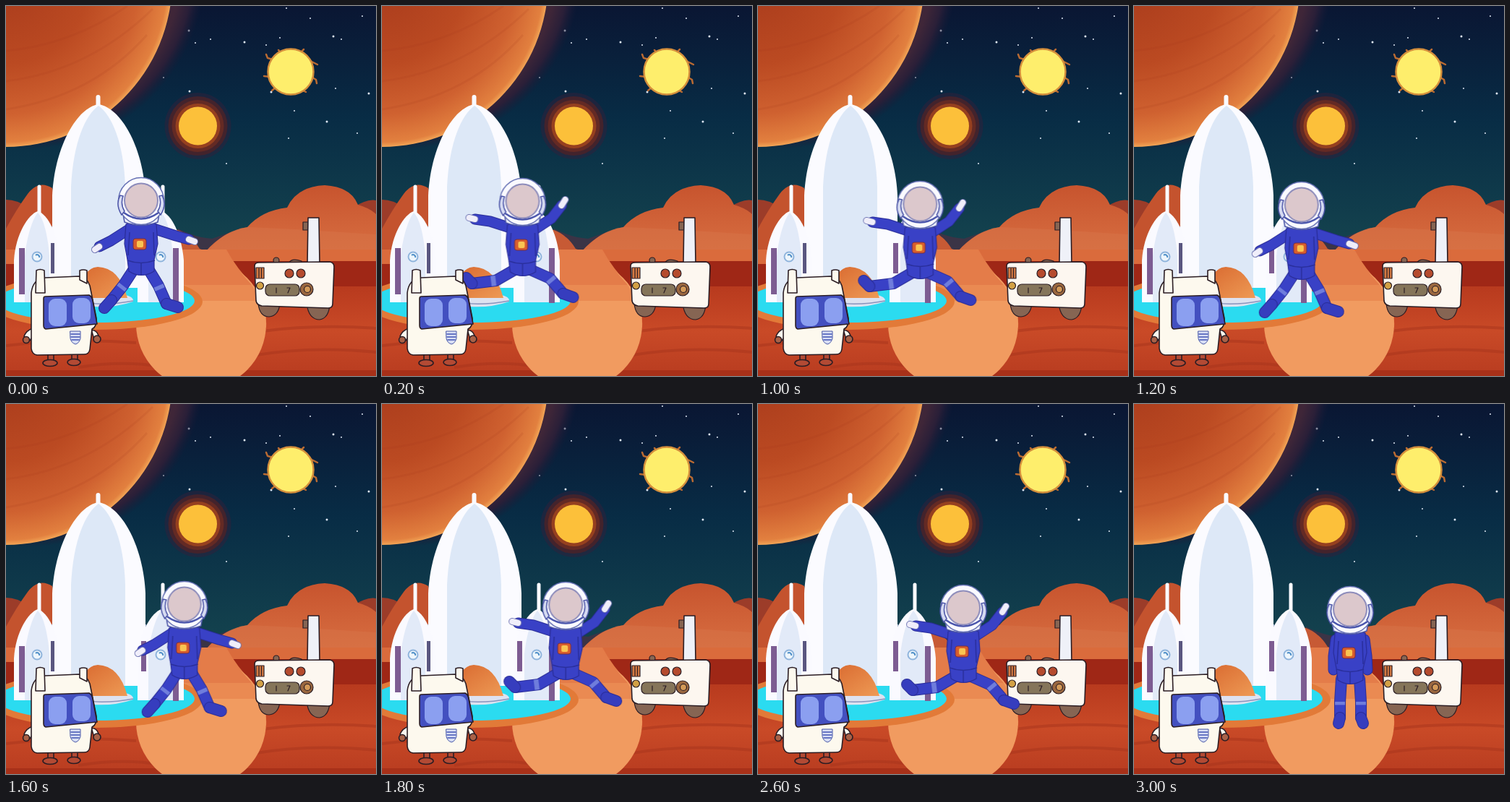
An HTML page that plays this animation: 512 by 512 pixels, repeating every 3.2 s.

```html
<!DOCTYPE html>
<html lang="en">
<head>
<meta charset="utf-8">
<title>Jumping astronaut</title>
<style>
  html, body { margin: 0; width: 100%; height: 100%; overflow: hidden; background: #a83a20; }
  svg { display: block; width: 100vw; height: 100vh; }
  .ink { stroke: #2b1d24; stroke-width: 1.6; stroke-linejoin: round; stroke-linecap: round; }
  .limb { fill: none; stroke-linejoin: round; }

  #astronaut { animation: travel 3200ms steps(16) infinite; }
  .pose { animation: 800ms step-end infinite; }
  #half { animation-name: half; }
  #full { animation-name: full; }
  #stand { animation-name: stand; }
  @keyframes travel {
    from { transform: translate(187px, 269px); }
    to { transform: translate(306.5px, 285px); }
  }
  @keyframes half { 0%, 50% { opacity: 1; } 25%, 75% { opacity: 0; } }
  @keyframes full { 0%, 50%, 75% { opacity: 0; } 25% { opacity: 1; } }
  @keyframes stand { 0%, 25%, 50% { opacity: 0; } 75% { opacity: 1; } }
</style>
</head>
<body>
<svg viewBox="0 0 512 512" preserveAspectRatio="none">
  <defs>
    <linearGradient id="sky" x2="0" y2="1">
      <stop offset="0" stop-color="#0a1633"/>
      <stop offset=".45" stop-color="#082c45"/>
      <stop offset="1" stop-color="#15454f"/>
    </linearGradient>
    <radialGradient id="planet" gradientUnits="userSpaceOnUse" cx="0" cy="-35" r="230">
      <stop offset="0" stop-color="#a93b1c"/>
      <stop offset=".5" stop-color="#bb4a22"/>
      <stop offset=".8" stop-color="#cf6130"/>
      <stop offset=".97" stop-color="#e2803f"/>
      <stop offset="1" stop-color="#f2a556"/>
    </radialGradient>
    <radialGradient id="shade" gradientUnits="userSpaceOnUse" cx="28" cy="-50" r="248">
      <stop offset=".86" stop-color="#3f2638"/>
      <stop offset=".93" stop-color="#2a1f38"/>
      <stop offset="1" stop-color="#1a1a36" stop-opacity="0"/>
    </radialGradient>
    <linearGradient id="dune" x2="0" y2="1">
      <stop offset="0" stop-color="#c7542e"/>
      <stop offset="1" stop-color="#dc7546"/>
    </linearGradient>
    <linearGradient id="soil" x2="0" y2="1">
      <stop offset="0" stop-color="#b83a1e"/>
      <stop offset=".5" stop-color="#c94a27"/>
      <stop offset="1" stop-color="#b83c20"/>
    </linearGradient>
    <linearGradient id="dome" x2="1" y2="1">
      <stop offset="0" stop-color="#d96a30"/>
      <stop offset="1" stop-color="#ee9a55"/>
    </linearGradient>
    <g id="tower">
      <path d="M3-34V2" stroke="#fafaff" stroke-width="5" stroke-linecap="round"/>
      <path d="M-32 126V68C-30 32-12 4 1 0C15 4 29 32 32 68V126Z" fill="#fafaff"/>
      <path d="M-17 126V62C-14 34-6 10 1 2C9 10 15 34 17 62V126Z" fill="#e2eaf8"/>
      <circle cy="63" r="6.5" fill="#eef6fc" stroke="#8fb4dc" stroke-width="2"/>
      <path d="M-2 61a3 3 0 0 1 5 3" fill="none" stroke="#4f8fc8" stroke-width="2"/>
    </g>
  </defs>

  <!-- sky -->
  <rect width="512" height="345" fill="url(#sky)"/>
  <g id="stars" fill="#dfe8f4"></g>
  <circle cx="28" cy="-50" r="248" fill="url(#shade)"/>
  <circle cy="-35" r="230" fill="url(#planet)"/>
  <g fill="none" stroke="#9e341b" stroke-width="3" opacity=".12">
    <path d="M0 62Q90 54 168 0M0 104Q115 90 203 4M0 143Q120 125 195 40"/>
  </g>
  <g transform="translate(265.5 166)">
    <circle r="46" fill="#33213a" opacity=".5"/>
    <circle r="41" fill="#43232c"/>
    <circle r="36" fill="#642a24"/>
    <circle r="31" fill="#96401f"/>
    <circle r="26.500" fill="#fcc03a"/>
  </g>
  <path d="M369 74l-7-2-2-5M365 98l-8-1M418 73l5 4 8 4M424 99l5 3 1 5M373 113l-5 4M411 117l4 2M380 64l-3-3M409 63l3-3"
    fill="none" stroke="#b96a32" stroke-width="2.500" stroke-linecap="round"/>
  <circle cx="394" cy="91" r="31.500" fill="#feee6c" stroke="#d58f3c" stroke-width="2.500"/>

  <!-- hills -->
  <path d="M0 268Q16 268 30 279V360H0ZM480 279Q500 266 512 269V360H480Z" fill="#9c3c29"/>
  <path d="M238 308Q260 320 285 322L325 308 350 345H238Z" fill="#3b3446"/>
  <path d="M0 308Q14 282 30 260Q45 240 64 252L90 360H0Z" fill="#c4532e"/>
  <path d="M235 309Q255 315 268 336L310 350H235Z" fill="#c75a35"/>
  <path d="M276 340Q300 312 334 306Q354 283 389 279Q402 250 441 248Q477 250 487 275Q504 280 512 288V365H276Z" fill="url(#dune)"/>
  <path d="M283 336Q302 310 335 306L400 309 512 316V365H283Z" fill="#d87348" opacity=".55"/>

  <!-- ground -->
  <rect y="337" width="512" height="70" fill="#da6b3c"/>
  <path d="M0 357H100V400H0ZM310 353H512V412H340Z" fill="#9f2716"/>
  <path d="M0 388H512V512H0Z" fill="url(#soil)"/>
  <g fill="none" stroke="#a8341d" stroke-width="4" opacity=".5">
    <path d="M355 450Q430 440 512 446M340 484Q420 470 512 479M0 470Q90 459 180 466M100 500Q160 490 215 499"/>
  </g>
  <path d="M0 504H512V512H0Z" fill="#a83119"/>
  <path d="M180 337H305Q318 362 345 390Q362 418 360 445H180Z" fill="#e47c49"/>
  <circle cx="270" cy="440" r="90" fill="#f19b60"/>
  <path d="M190 337H303Q316 360 340 386H190Z" fill="#e47c49"/>
  <path d="M195 386H340L352 408H188Z" fill="#ea8a52"/>

  <!-- base -->
  <ellipse cx="124" cy="409" rx="148" ry="39" fill="#e27a38"/>
  <ellipse cx="124" cy="408" rx="137" ry="30" fill="#2bdbf0"/>
  <path d="M62 305h10v65H62ZM184 305h10v65h-10Z" fill="#9ba8cc"/>
  <path d="M127.500 126V142" stroke="#fafaff" stroke-width="6" stroke-linecap="round"/>
  <path d="M64 390V262C67 197 97 141 128 136C160 141 190 197 193 262V390Z" fill="#fbfbff"/>
  <path d="M90 390V250C93 188 110 151 128 138C146 151 163 188 165 250V390Z" fill="#dde8f7"/>
  <use href="#tower" x="43" y="284"/>
  <use href="#tower" x="214" y="284"/>
  <path d="M18 335h8v64h-8ZM231 335h8v76h-8ZM187 328h7v42h-7Z" fill="#7d5c92"/>
  <path d="M62 328h5v42h-5Z" fill="#5a5680"/>
  <path d="M94 407Q96 400 110 400H164Q177 402 176 409Q150 418 120 416Z" fill="#dde2f0"/>
  <path d="M103 404Q103 363 127 361Q157 362 168 404Z" fill="url(#dome)"/>
  <path d="M95 409Q135 416 176 408" fill="none" stroke="#8a94bd" stroke-width="1.500"/>

  <!-- rover -->
  <g class="ink" fill="#fdf7f0">
    <g fill="#866553" stroke-width="1.200">
      <path d="M349 412Q351 430 364 430Q377 429 379 412Z"/>
      <path d="M416 412Q419 434 434 434Q447 432 448 412Z"/>
      <circle cx="374" cy="352" r="4"/><path d="M391 356q4-8 18-3v4Z"/>
      <rect x="411" y="299" width="7" height="11"/>
    </g>
    <path d="M418 293H433L434 356H417Z" fill="#eff1f8"/>
    <path d="M344 360Q344 355 350 355L448 354Q454 355 454 361L452 412Q452 418 446 418L354 415Q347 414 346 408Z"/>
    <g stroke-width="1.200">
      <circle cx="392" cy="370" r="6" fill="#b54b2e"/><circle cx="408" cy="370" r="6" fill="#b54b2e"/>
      <rect x="346" y="362" width="11" height="15" fill="#d67b43"/>
      <path d="M350 363v13M353.500 363v13"/>
      <circle cx="351.500" cy="387" r="5" fill="#d3a145"/>
      <rect x="359" y="385" width="47" height="16" rx="6" fill="#85755a"/>
      <path d="M374 390v7M389 390h4l-3 7" fill="none"/>
      <circle cx="416" cy="392" r="9" fill="#9a673f"/><circle cx="417" cy="392" r="4.500" fill="#d49a58"/>
    </g>
  </g>

  <!-- astronaut, placed by the helmet centre -->
  <g id="astronaut">
    <g id="half" class="pose"></g>
    <g id="full" class="pose"></g>
    <g id="stand" class="pose"></g>
    <path d="M-21 33Q0 25 21 33L23 60 18 82 18 98Q0 109-17 98L-19 82-23 60Z" fill="#3941c6" stroke="#2a2d98" stroke-width="1.200"/>
    <path d="M-19 83Q0 90 19 83M-16 44L-18 76M17 44L18 76M0 87V103" fill="none" stroke="#2a2f9c" stroke-width="1.500"/>
    <rect x="-11" y="53" width="18" height="15" rx="3" fill="#d95e2d" stroke="#752d45"/>
    <rect x="-6" y="56" width="9" height="9" rx="2" fill="#f9c452"/>
    <path d="M-25 19Q0 35 25 19L23 30Q0 39-23 30Z" fill="#eef0fb" stroke="#4952a6" stroke-width="1.500"/>
    <ellipse cy="1" rx="31.500" ry="32.500" fill="#fafaff" stroke="#6570b4" stroke-width="1.500"/>
    <path d="M-29-7Q-36 6-27 20L-23 15Q-29 5-25-6ZM29-7Q36 6 27 20L23 15Q29 5 25-6Z" fill="#d7dcf2" stroke="#4952a6" stroke-width="1.500"/>
    <path d="M-24 17Q0 34 24 17" fill="none" stroke="#4a55ac" stroke-width="2.500"/>
    <ellipse rx="23" ry="23.500" fill="#dcc8cc" stroke="#8d8cbb" stroke-width="2"/>
  </g>

  <!-- small robot -->
  <g class="ink" fill="#fdf9ee" transform="translate(-1 0)" stroke-width="2">
    <path d="M38 446Q29 449 26 457L34 463 40 454ZM119 448Q127 449 129 456L123 461Z"/>
    <circle cx="29" cy="462" r="4.500" fill="#a86147"/><circle cx="127" cy="461" r="5" fill="#a86147"/>
    <g fill="#b34a34">
      <rect x="59" y="480" width="8" height="12"/><rect x="92" y="480" width="8" height="12"/>
      <ellipse cx="62" cy="494" rx="10" ry="4.500"/><ellipse cx="95" cy="493" rx="9" ry="4.500"/>
    </g>
    <path d="M36 397Q38 378 55 376L102 374Q113 375 117 387L126 432Q127 444 120 447L117 475Q116 482 109 482L44 483Q37 482 36 474Z"/>
    <path d="M43 366Q48 363 54 366L55 397H42ZM103 366Q108 364 113 366V384L103 379Z"/>
    <path d="M55 402L116 400Q120 402 121 408L127 440 56 447Q53 446 53 442V405Q53 402 55 402Z" fill="#4350c0"/>
    <rect x="60" y="405" width="25" height="38" rx="9" fill="#8b9ff0" stroke="none"/>
    <rect x="93" y="404" width="25" height="35" rx="9" fill="#8b9ff0" stroke="none"/>
    <path d="M90 450h14v10q-2 7-7 8q-6-2-7-8Z" fill="#d8def4" stroke="#4a59a8" stroke-width="1"/>
    <path d="M91 454h12M91 458h12M92 462h10" stroke="#4356b4"/>
  </g>
</svg>
<script>
  const NS = 'http://www.w3.org/2000/svg';
  const add = (parent, tag, attrs) => {
    const el = document.createElementNS(NS, tag);
    for (const k in attrs) el.setAttribute(k, attrs[k]);
    parent.append(el);
  };

  const stars = [[253, 34], [283, 46], [262, 51], [330, 50], [360, 54], [379, 44], [453, 42], [421, 17],
    [493, 14], [367, 119], [456, 114], [399, 145], [444, 160], [391, 183], [486, 176], [502, 121],
    [305, 218], [218, 99], [254, 118], [388, 3], [464, 46]];
  stars.forEach(([cx, cy], i) => add(document.getElementById('stars'), 'circle', { cx, cy, r: i % 3 ? 1 : 1.5 }));

  // Each limb runs through root, joint, ankle or wrist, and tip.
  const poses = {
    half: {
      legs: ['-10 95 -25 118 -41 138 -51 149', '10 95 24 118 35 143 51 148'],
      arms: ['-17 40 -42 56 -58 64 -64 68', '17 39 48 49 66 54 74 57']
    },
    full: {
      legs: ['-11 95 -37 110 -70 114 -78 106', '11 95 38 107 56 128 70 133'],
      arms: ['-17 37 -45 28 -66 25 -74 23', '17 39 40 24 54 6 59 -2']
    },
    stand: {
      legs: ['-12 96 -14 128 -14 150 -16 158', '13 96 15 128 15 150 18 158'],
      arms: ['-20 42 -23 65 -23 84 -22 90', '20 42 23 65 24 84 23 90']
    }
  };
  const BLUE = '#3941c6', EDGE = '#2a2d98';

  function limb(group, points, width, isLeg, hideHand) {
    const n = points.split(' ').map(Number);
    const line = (d, color, w, cap = 'round') =>
      add(group, 'path', { class: 'limb', d, stroke: color, 'stroke-width': w, 'stroke-linecap': cap });
    const upper = `M${n.slice(0, 6)}`, tip = `M${n.slice(4)}`;
    line(upper, EDGE, width + 2);
    line(upper, BLUE, width);
    if (isLeg) {
      const [x, y] = n.slice(2), dx = n[4] - x, dy = n[5] - y;
      line(`M${x} ${y}L${x + dx * .2} ${y + dy * .2}`, '#6f7ddc', width, 'butt');
      line(tip, EDGE, width + 2);
      line(tip, '#363dbe', width);
    } else if (!hideHand) {
      line(tip, '#6a70b0', 10);
      line(tip, '#f0eefa', 8);
    }
  }

  for (const name in poses) {
    const group = document.getElementById(name);
    poses[name].legs.forEach(p => limb(group, p, 14, true));
    poses[name].arms.forEach(p => limb(group, p, 13, false, name === 'stand'));
  }
</script>
</body>
</html>
```
